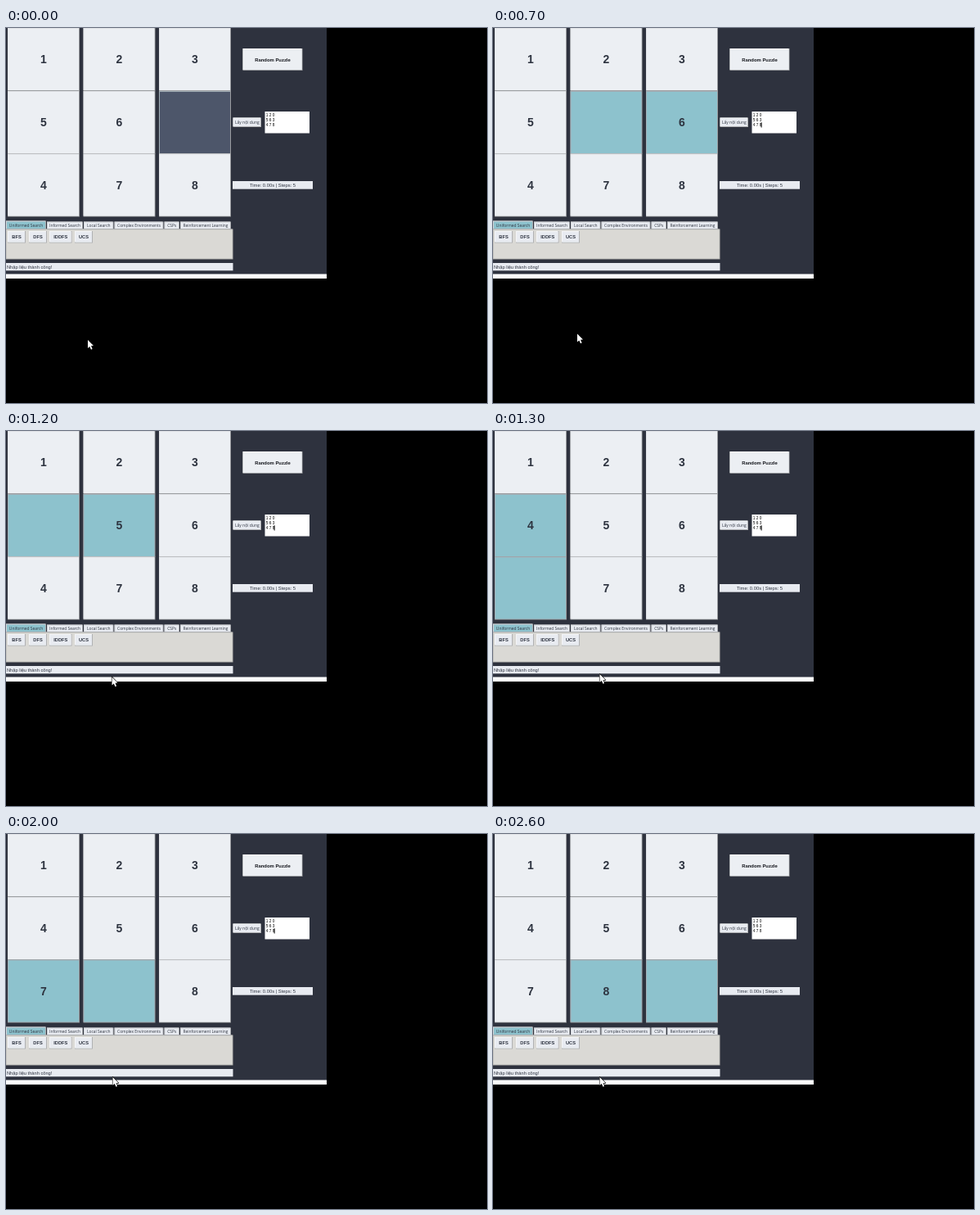
Recreate the animation shown at these times as an HTML page with a canvas. Size 588 by 458 pixels, loop 2800 ms.

```html
<!DOCTYPE html>
<html lang="en">
<head>
<meta charset="utf-8">
<title>8-puzzle solver</title>
<style>
html, body { margin: 0; width: 100%; height: 100%; overflow: hidden; background: #000; }
canvas { display: block; }
</style>
</head>
<body>
<canvas id="stage" width="588" height="458"></canvas>
<script>
const ctx = document.getElementById('stage').getContext('2d');
const LOOP = 2800;
const SANS = '"Liberation Sans", Arial, sans-serif';
const UI = '"Open Sans", "Noto Sans", sans-serif';
const C = {
  bg: '#2e323e', tile: '#eceff3', teal: '#8dc2cd', blank: '#4d566a',
  ink: '#2e3440', bar: '#e8ebf1', panel: '#dad9d5', edge: '#9b9da0', light: '#fafbfc'
};

const COLS = [2, 94.5, 187], ROWS = [0, 77, 153.5];
const START = [1, 2, 3, 5, 6, 0, 4, 7, 8];
const BLANK_PATH = [5, 4, 3, 6, 7, 8];
const FIRST_MOVE = 300, MOVE_GAP = 500;

// pointer tip: time, x, y
const POINTER = [
  [0, 100, 381], [500, 100, 381], [600, 102, 376], [800, 104, 371],
  [1000, 117, 334], [1200, 129.5, 300.5], [1300, 130.5, 297]
];
const TABS = [
  ['Uniformed Search', 0, 49], ['Informed Search', 50, 94], ['Local Search', 95, 131.5],
  ['Complex Environments', 132.5, 192.5], ['CSPs', 193.5, 212], ['Reinforcement Learning', 213, 275]
];
const ALGOS = [['BFS', 2, 24], ['DFS', 28, 50], ['IDDFS', 53, 80.5], ['UCS', 84, 106]];

function rect(x, y, w, h, color) {
  ctx.fillStyle = color;
  ctx.fillRect(x, y, w, h);
}

function raised(x, y, w, h, color, top = C.light, bottom = C.edge) {
  rect(x, y, w, h, bottom);
  rect(x, y, w - 1, h - 1, top);
  rect(x + 1, y + 1, w - 2, h - 2, color);
}

function text(str, x, y, font, align = 'center', color = C.ink) {
  ctx.font = font;
  ctx.textAlign = align;
  ctx.textBaseline = 'alphabetic';
  ctx.fillStyle = color;
  ctx.fillText(str, x, y);
}

function boardAt(moves) {
  const cells = START.slice();
  for (let i = 1; i <= moves; i++) {
    const from = BLANK_PATH[i], to = BLANK_PATH[i - 1];
    cells[to] = cells[from];
    cells[from] = 0;
  }
  return cells;
}

function drawBoard(t) {
  const moves = Math.max(0, Math.min(5, Math.floor((t - FIRST_MOVE) / MOVE_GAP) + 1));
  const lit = moves ? BLANK_PATH.slice(moves - 1, moves + 1) : [];
  boardAt(moves).forEach((n, i) => {
    const x = COLS[i % 3], y = ROWS[Math.floor(i / 3)];
    const color = lit.includes(i) ? C.teal : n ? C.tile : C.blank;
    raised(x, y, 88, 77, color, n && color === C.tile ? '#e0e2e6' : '#a4b0b8');
    if (n) text(n, x + 44, y + 43.4, `bold 14px ${SANS}`);
  });
}

function drawNotebook() {
  raised(0, 245.5, 277.5, 37, C.panel, '#c4c3bf', '#b5b4b0');
  TABS.forEach(([label, x1, x2], i) => {
    const y = i ? 236.5 : 235.5;
    raised(x1, y, x2 - x1, 246 - y, i ? C.bar : C.teal, '#cfd2d6', '#aeb0b3');
    text(label, (x1 + x2) / 2, 242.9, `4.9px ${UI}`);
  });
  for (const [label, x1, x2] of ALGOS) {
    raised(x1, 248, x2 - x1, 14.5, C.bar, '#f4f5f7', '#b0b1b3');
    text(label, (x1 + x2) / 2, 257.3, `bold 5.7px ${SANS}`);
  }
  rect(0, 287, 277.5, 9.3, C.bar);
  text('Nhập liệu thành công!', 1, 293.7, `5.7px ${SANS}`, 'left');
}

function drawSide(t) {
  raised(289.5, 25, 73, 27, C.tile);
  text('Random Puzzle', 326, 40.7, `bold 5.9px ${SANS}`, 'center', '#14161c');

  raised(277.5, 109.5, 34.5, 11.5, C.bar, '#f4f5f7', '#b0b1b3');
  text('Lấy nội dung', 294.8, 117.1, `5px ${UI}`);

  rect(316.5, 102, 54.5, 26.5, '#fff');
  ['1 2 0', '5 6 3', '4 7 8'].forEach((line, i) =>
    text(line, 317.8, 107.9 + i * 6.1, `4.8px ${SANS}`, 'left', '#000'));
  // caret: 600 ms on, 300 ms off
  if ((t + 700) % 900 < 600) rect(327.6, 115.3, 1, 6.2, '#000');

  rect(277, 187, 98, 9.7, C.bar);
  text('Time: 0.00s | Steps: 5', 326, 193.9, `5.8px ${SANS}`);
}

function pointerAt(t) {
  const k = POINTER.findIndex(p => p[0] > t);
  if (k < 0) return POINTER[POINTER.length - 1].slice(1);
  const [t0, x0, y0] = POINTER[k - 1], [t1, x1, y1] = POINTER[k];
  const f = (t - t0) / (t1 - t0);
  return [x0 + (x1 - x0) * f, y0 + (y1 - y0) * f];
}

function drawPointer(t) {
  const [x, y] = pointerAt(t);
  ctx.save();
  ctx.translate(x, y);
  ctx.beginPath();
  [[0, 0], [0, 10], [2.3, 8], [4, 11.8], [5.6, 11], [4, 7.3], [7, 7.1]]
    .forEach(p => ctx.lineTo(...p));
  ctx.closePath();
  ctx.lineJoin = 'round';
  ctx.lineWidth = 1.2;
  ctx.strokeStyle = '#000';
  ctx.stroke();
  ctx.fillStyle = '#fff';
  ctx.fill();
  ctx.restore();
}

function draw() {
  const t = Math.floor((performance.now() % LOOP) / 100) * 100;
  rect(0, 0, 588, 458, '#000');
  rect(0, 0, 392, 306, C.bg);
  rect(0, 300.5, 392, 5.5, '#fff');
  drawBoard(t);
  drawNotebook();
  drawSide(t);
  drawPointer(t);
  requestAnimationFrame(draw);
}
draw();
</script>
</body>
</html>
```
